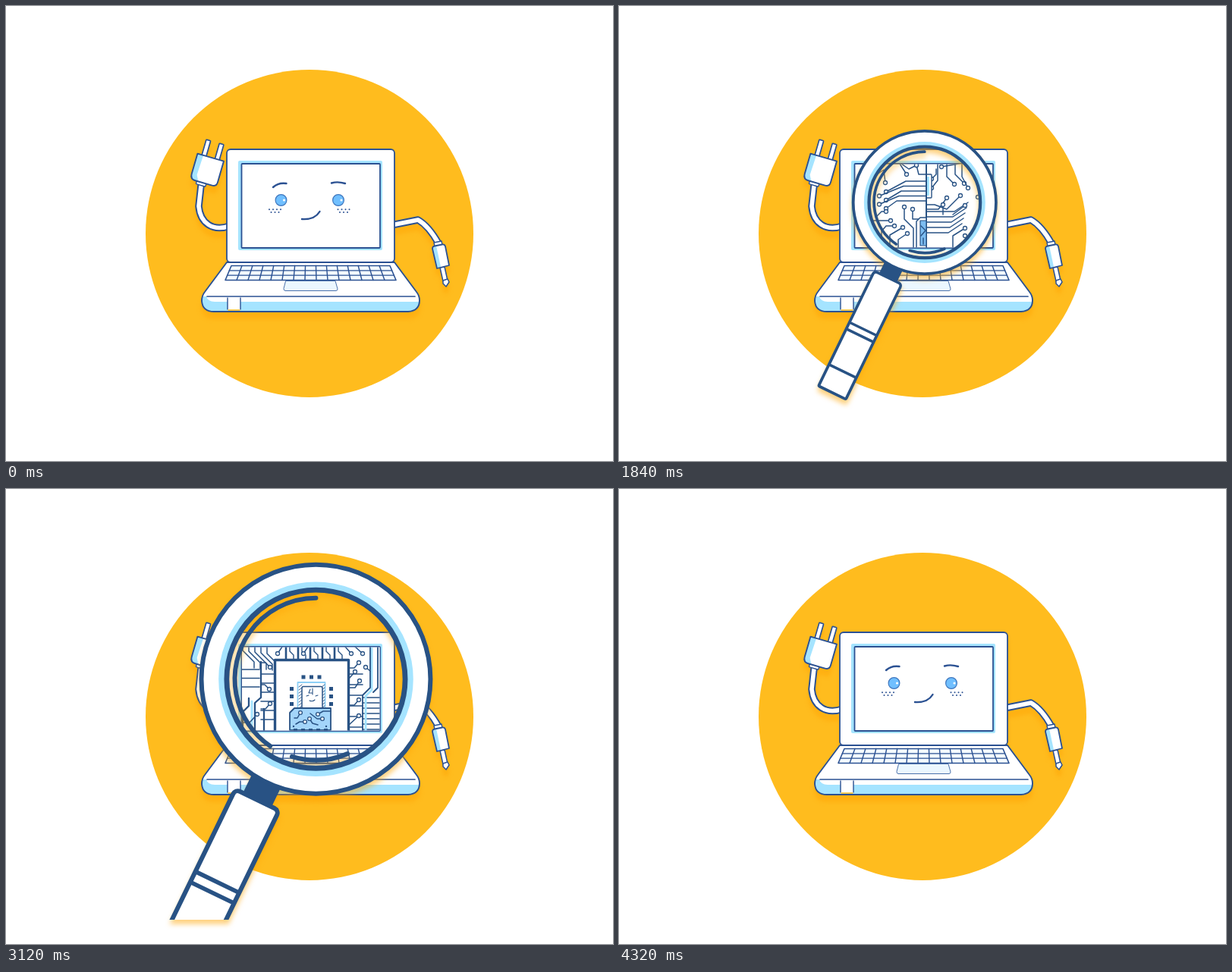
These frames come from a looping animation (800 by 600 pixels, 4.92 s). An HTML page with a canvas:

```html
<!DOCTYPE html>
<html lang="en">
<head>
<meta charset="utf-8">
<title>Laptop check</title>
<style>
html, body { margin: 0; width: 100%; height: 100%; overflow: hidden; background: #fff; }
canvas { display: block; }
</style>
</head>
<body>
<canvas id="stage" width="800" height="600"></canvas>
<script>
const W = 800, H = 600, LOOP = 4920, STEP = 40;
const NAVY = '#2b5192', STEEL = '#285284', ICE = '#a5e4ff', SKY = '#70bfff';
const SHADE = 'rgba(255,165,5,0.5)';
const out = document.getElementById('stage').getContext('2d');

function layer() {
  const c = document.createElement('canvas');
  c.width = W;
  c.height = H;
  return c.getContext('2d');
}
const laptop = layer(), glass = layer();
let g = laptop;

const clamp = v => Math.max(0, Math.min(1, v));
const mix = (a, b, k) => a + (b - a) * k;

function paint(fill, stroke, width) {
  if (fill) { g.fillStyle = fill; g.fill(); }
  if (stroke) { g.strokeStyle = stroke; g.lineWidth = width; g.stroke(); }
}
function shape(d, fill, stroke, width = 1.7) {
  const p = new Path2D(d);
  if (fill) { g.fillStyle = fill; g.fill(p); }
  if (stroke) { g.strokeStyle = stroke; g.lineWidth = width; g.stroke(p); }
}
function box(x, y, w, h, r, fill, stroke, width = 1.7) {
  g.beginPath();
  g.roundRect(x, y, w, h, r);
  paint(fill, stroke, width);
}
function dot(x, y, r, fill, stroke, width = 1.2) {
  g.beginPath();
  g.arc(x, y, r, 0, 7);
  paint(fill, stroke, width);
}
function cable(d) {
  shape(d, null, NAVY, 9.5);
  shape(d, null, '#fff', 5.6);
}
function withShadow(ctx, src, dy, blur) {
  ctx.save();
  ctx.shadowColor = SHADE;
  ctx.shadowOffsetY = dy;
  ctx.shadowBlur = blur;
  ctx.drawImage(src.canvas, 0, 0);
  ctx.restore();
}

function drawPlug() {
  cable('M257 237 L254 264 C256 286 272 298 295 290');
  g.save();
  g.translate(265, 216);
  g.rotate(0.28);
  box(-12, -38, 6, 22, 1, '#fff', NAVY);
  box(6, -38, 6, 22, 1, '#fff', NAVY);
  box(-9, 16, 13, 6, 1, '#fff', NAVY, 1.4);
  shape('M-18 -17 H18 V12 Q18 18 12 18 H-11 Q-18 18 -18 11 Z', '#fff');
  shape('M-18 -17 H-10 L-11 10 L-7 18 H-11 Q-18 18 -18 11 Z', ICE);
  shape('M-18 -17 H18 V12 Q18 18 12 18 H-11 Q-18 18 -18 11 Z', null, NAVY, 1.9);
  g.restore();
}

function drawJack() {
  cable('M508 289 L543 282 Q557 290 570 313');
  shape('M572 345 L578 344 L582 362 L576 363 Z', '#fff', NAVY, 1.5);
  shape('M576 362 L582 360 L584 364 L580 370 L576 366 Z', '#fff', NAVY, 1.5);
  shape('M564 312 L574 310 L575 315 L565 317 Z', '#fff', NAVY, 1.4);
  const body = 'M562 320 Q562 317 565 316.500 L575 314.500 Q578 314 579 317 L584 342 L568 346 Z';
  shape(body, '#fff');
  shape('M562 320 L567 316 L573 344 L568 346 Z', ICE);
  shape(body, null, NAVY, 1.8);
}

function drawKeys() {
  shape('M297 342.500 H506 L514 361.500 H289 Z', '#f3faff', NAVY, 1.6);
  g.beginPath();
  for (let i = 1; i < 15; i++) {
    g.moveTo(297 + 209 * i / 15, 342.5);
    g.lineTo(289 + 225 * i / 15, 361.5);
  }
  for (const k of [1 / 3, 2 / 3]) {
    g.moveTo(297 - 8 * k, 342.5 + 19 * k);
    g.lineTo(506 + 8 * k, 342.5 + 19 * k);
  }
  paint(null, NAVY, 1.4);
}

function drawFace() {
  for (const x of [362.5, 438]) {
    dot(x, 256, 7.4, SKY, '#3f76bd');
    dot(x + 4, 256, 1.5, '#fff');
  }
  shape('M352 239 Q359 232.500 369.500 234', null, NAVY, 2.4);
  shape('M429 233.500 Q437 231 447 234', null, NAVY, 2.4);
  shape('M390 281 Q407 282 413.500 271', null, NAVY, 2.4);
  for (const x of [347, 437.5]) {
    for (let i = 0; i < 4; i++) dot(x + 5 * i, 268.3, 1, NAVY);
    for (let i = 0; i < 3; i++) dot(x + 2.5 + 5 * i, 272, 1, NAVY);
  }
}

function drawLaptop() {
  g = laptop;
  g.lineCap = g.lineJoin = 'round';
  drawPlug();
  drawJack();
  const base = 'M291 338 L262 377 Q258 382 258 389 Q259 403 274 403 H530 Q545 402 545 388 Q545 382 541 377 L512 338 Z';
  shape(base, '#fff');
  g.save();
  g.clip(new Path2D(base));
  shape('M258 383 H264 Q266 390 275 390 H545 V404 H258 Z', ICE);
  g.restore();
  shape(base, null, NAVY, 1.9);
  shape('M265 383 H539', null, NAVY, 1.7);
  box(292, 385, 17, 16, 0, '#fff');
  shape('M292 385 V400 M309 385 V400', null, NAVY, 1.4);
  shape('M293 401 H308', null, '#ffbc1e', 1.5);
  box(291, 189, 221, 149, 5, '#fff', NAVY, 1.8);
  box(306, 204, 190, 118, 2, ICE);
  box(310.5, 208, 182.5, 111, 1, '#fff', NAVY, 1.8);
  drawKeys();
  shape('M369 362.500 H434 L437 373 Q437 375.500 435 375.500 H368 Q366 375.500 366 373 Z', '#ebf7ff', '#4a70aa', 1);
  drawFace();
}

// Each trace is "x y x y ..." and ends in an open pad.
function trace(list, r = 2.5) {
  for (const s of list) {
    const p = s.split(' ').map(Number), n = p.length;
    g.beginPath();
    for (let i = 0; i < n; i += 2) g.lineTo(p[i], p[i + 1]);
    paint(null, STEEL, 1.5);
    if (r) dot(p[n - 2], p[n - 1], r, '#fff', STEEL, 1.3);
  }
}
function rails(x1, x2, y, gap, n) {
  for (let i = 0; i < n; i++) shape(`M${x1} ${y + gap * i} H${x2}`, null, STEEL, 1.6);
}

function boardBus() {
  shape('M356 218 H438', null, STEEL, 1.6);
  rails(340, 381, 269, 7, 5);
  rails(390, 428, 276, 7, 5);
  rails(436, 460, 269, 7, 5);
  for (const x of [373, 399, 430]) {
    shape(`M${x} 218 V250`, null, ICE, 4);
    shape(`M${x - 2} 218 V250 M${x + 3} 218 V248`, null, STEEL, 1.4);
  }
  for (const x of [385, 431]) {
    shape(`M${x} 258 V308`, null, ICE, 6);
    shape(`M${x - 4} 258 V308 M${x + 5} 258 V308`, null, STEEL, 1.8);
    shape(`M${x - 4} 258 L${x - 12} 250 M${x + 5} 258 L${x + 13} 250`, null, STEEL, 1.8);
  }
  for (let i = 0; i < 4; i++) {
    shape(`M${372 + i} ${246 + 5 * i} L${388 + i} ${231 + 5 * i} H399`, null, STEEL, 1.5);
  }
  shape('M381 273 L390 266 M381 273 L389 280 M381 292 L390 285', null, STEEL, 1.5);
  trace(['371 225 371 250 362 253', '340 260 348 260 352 268', '390 269 401 269 409 253',
    '397 276 408 268 416 259', '428 262 424 262 418 254', '428 276 424 274 418 268',
    '404 220 404 231 415 233', '436 222 436 238 430 241 420 241', '420 220 420 229 415 233',
    '428 262 438 254', '436 269 441 267 448 260']);
}

function boardSeam() {
  for (let i = 0; i < 5; i++) {
    const y = 231 + 6.5 * i, x = 378 - 3 * i;
    trace([`405 ${y} ${x} ${y} ${352 - (i % 2) * 9} ${y + 14 - i}`]);
    shape(`M405 ${271 + 7 * i} H${442 - 2 * i} L${460 - 2 * i} ${259 + 7 * i}`, null, STEEL, 1.5);
  }
  trace(['372 208 382 215 392 210', '349 208 370 208 379 222', '340 222 349 216 351 233',
    '330 283 348 283 358 283', '346 319 346 297 352 290 363 290', '357 319 357 302 374 292',
    '368 319 368 308 380 300', '388 319 388 293 376 281 376 265', '398 281 387 281 387 268',
    '340 277 346 271 352 271', '404 222 395 222 392 210']);
  trace(['448 208 425 212', '418 215 418 222 412 228', '420 208 420 230 412 240',
    '432 208 432 225 442 235', '443 208 443 222 455 234', '452 208 452 225 460 240',
    '405 268 421 268 432 253', '405 262 416 262 432 268 450 250', '427 275 427 262',
    '440 275 456 263', '440 319 440 303 456 293', '465 319 465 308 456 303', '478 270 478 256 473 252']);
  box(405, 222, 7, 31, 1, '#fff', STEEL, 1.4);
  box(406, 225, 3, 25, 0, ICE);
  shape('M405 208 V319', null, STEEL, 2);
  shape('M392 319 V284 L397 279 H405 V319 Z', '#fff', STEEL, 1.5);
  box(397, 283, 8, 33, 0, '#7dbdf1', STEEL, 1.2);
  shape('M398 290 L404 296 L398 303 M401 306 V314', null, STEEL, 1.4);
}

function drawChip(t) {
  box(354.5, 225.5, 97, 100, 0, '#fff', STEEL, 3.4);
  for (let i = 0; i < 3; i++) {
    for (const [x, y] of [[392 + 10.5 * i, 248], [376.5, 263.5 + 10 * i], [428.5, 263.5 + 10 * i]]) {
      box(x - 2.5, y - 2.5, 5, 5, 0, STEEL);
    }
  }
  box(384.5, 255, 36, 38, 0, '#fff', '#8ed0f6', 1.8);
  for (let i = 0; i < 8; i++) {
    shape(`M386 ${261 + 4 * i} l4 -3 M416 ${261 + 4 * i} l4 -3`, null, STEEL, 0.9);
  }
  box(390, 260.5, 27, 34, 2, '#fff', STEEL, 1.5);
  // tiny face inside the chip
  const look = t < 3360 ? 0 : 3;
  shape(`M${401 + look} 264 l-2 5 h4 M${404 + look} 263 v8`, null, STEEL, 1.1);
  shape('M396 273 l3 -1 M408 273 l3 -1 M400 279 q4 2 7 -1', null, STEEL, 1.1);
  if (look) {
    g.beginPath();
    g.ellipse(421.5, 251, 2.6, 3.8, 0, 0, 7);
    paint('#fff', STEEL, 1.2);
  }
  shape('M374 318 V295 L380 289 H428 V318 Z', '#a3d5fa', STEEL, 1.8);
  trace(['380 302 384 302 388 295', '428 293 418 293 411 297', '401 296 410 303 417 303',
    '382 310 387 307 394 307', '411 311 404 309 400 303'], 2.4);
  for (const x of [379, 422]) dot(x, 313, 1.2, STEEL);
  for (let i = 0; i < 5; i++) box(379 + 10 * i, 316, 5, 3, 0, STEEL);
}

function boardChip(t) {
  rails(310, 334, 238, 11.5, 3);
  rails(470, 493, 275, 7, 7);
  rails(336, 355, 244, 12, 6);
  rails(452, 470, 244, 14, 6);
  for (let i = 0; i < 5; i++) {
    shape(`M${312 + 8 * i} 208 V${213 + i} L${327 + 8 * i} ${228 + i} V${236 + i}`, null, STEEL, 1.5);
  }
  shape('M336 228 V275 L328 282 V319 M312 319 V294 L320 286 V276 M340 290 V319', null, STEEL, 2.3);
  shape('M324 280 V319 M482 210 V265 L474 273 V319', null, ICE, 3);
  shape('M480 208 V262 L470 272 V319 M490 208 V262 L484 268', null, STEEL, 1.8);
  for (let i = 0; i < 5; i++) {
    const x = 369 + 16 * i;
    shape(`M${x} 208 V225`, null, STEEL, 2.6);
    shape(`M${x + 5} 208 V214 L${x + 10} 219 V225`, null, STEEL, 1.4);
  }
  trace(['336 229 342 229 348 235', '336 258 341 258 347 264', '336 290 342 290 348 283',
    '310 308 321 308 331 297', '364 208 358 217', '398 208 392 217', '447 208 455 217',
    '460 208 470 217', '452 236 459 236 465 229', '452 250 460 241', '452 262 460 262 466 253',
    '452 285 459 285 465 278', '480 240 474 235', '452 311 465 299']);
  drawChip(t);
}

// Boards open outward from the seam, one over the other.
const boards = [[560, 1000, boardBus], [1320, 1720, boardSeam], [1880, 2400, boardChip]];

function drawBoards(t, lens) {
  g = out;
  g.save();
  g.lineCap = g.lineJoin = 'round';
  g.beginPath();
  g.arc(lens.x, lens.y, lens.r * 0.765, 0, 7);
  g.clip();
  g.beginPath();
  g.rect(311, 208.5, 181.5, 110);
  g.clip();
  for (const [start, end, draw] of boards) {
    if (t < start) break;
    const k = clamp((t - start + STEP) / (end - start));
    g.beginPath();
    g.rect(mix(404, 310, k), 208, mix(0, 184, k), 112);
    g.clip();
    g.fillStyle = '#fff';
    g.fill();
    draw(t);
    if (k < 1) {
      g.beginPath();
      g.rect(mix(404, 310, k), 208, mix(0, 184, k), 112);
      paint(null, STEEL, 1.8);
      break;
    }
  }
  g.restore();
}

function drawBoardStack(t, lens) {
  // start from the latest fully open board so that the opening one lies above it
  let first = 0;
  boards.forEach(([, end], i) => { if (t >= end) first = i; });
  const all = boards.slice();
  boards.splice(0, first);
  drawBoards(t, lens);
  boards.splice(0, boards.length, ...all);
}

function drawGlass(lens) {
  g = glass;
  g.clearRect(0, 0, W, H);
  g.save();
  g.beginPath();
  g.rect(3, 0, W, 568);
  g.clip();
  g.translate(lens.x, lens.y);
  g.scale(lens.r / 180, lens.r / 180);
  g.lineCap = g.lineJoin = 'round';

  g.save();
  g.rotate(0.452);
  box(-24.5, 168, 49, 42, 0, STEEL);
  box(-37.5, 207, 75, 316, [8, 8, 3, 3], '#fff', STEEL, 7);
  for (const y of [348, 366, 464]) shape(`M-37 ${y} H37`, null, STEEL, 6.5);
  g.restore();

  dot(0, 0, 159, null, '#fff', 38);
  dot(0, 0, 144, null, ICE, 12);
  dot(0, 0, 137.5, null, STEEL, 8);
  dot(0, 0, 176.5, null, STEEL, 7);
  for (const [a, b] of [[2.17, 4.712], [1.17, 1.87]]) {
    g.beginPath();
    g.arc(0, 0, 125, a, b);
    paint(null, STEEL, 7);
  }
  g.restore();
}

function lensAt(t) {
  const r = 67 + 113 * clamp((t - 1200) / 2495);
  const k = (r - 67) / 113;
  let x = 400 + 11 * k;
  if (t < 400) x -= (400 - t) * 1.2;
  if (t > 3700) x -= (t - 3700) * 0.947;
  return { x, y: 263 - 16 * k, r };
}

function frame(now) {
  const t = Math.floor((now % LOOP) / STEP) * STEP;
  out.fillStyle = '#fff';
  out.fillRect(0, 0, W, H);
  g = out;
  dot(400, 300, 216, '#ffbc1e');
  withShadow(out, laptop, 9, 5);
  if (t >= 40 && t < 4320) {
    const lens = lensAt(t);
    if (t >= 560) drawBoardStack(t, lens);
    drawGlass(lens);
    withShadow(out, glass, 6, 6);
  }
}

drawLaptop();
const begin = performance.now();
function tick() {
  frame(performance.now() - begin);
  requestAnimationFrame(tick);
}
tick();
</script>
</body>
</html>
```
